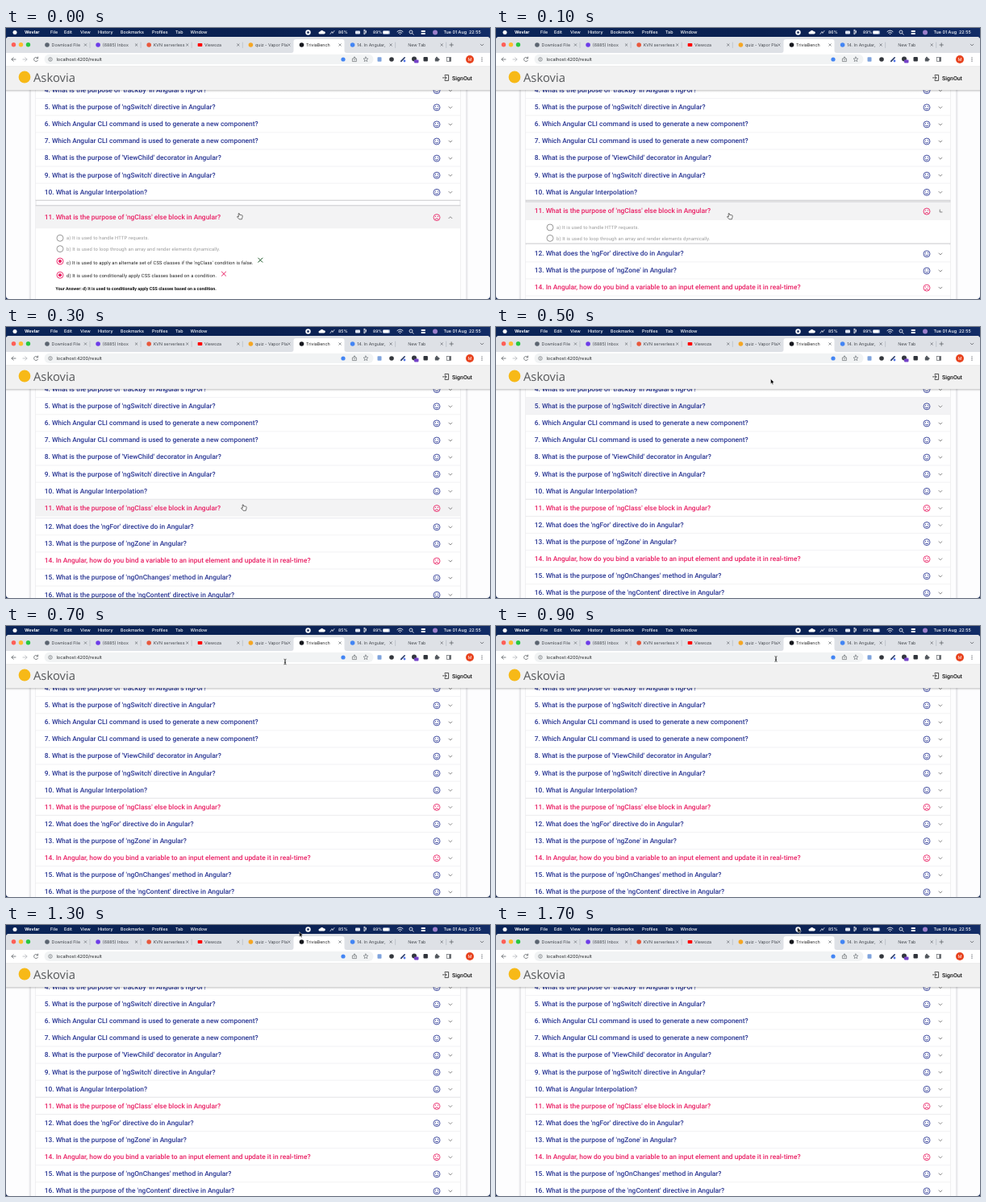
These frames come from a looping animation (600x337 px, 1.8 s). An HTML page:

```html
<!DOCTYPE html>
<html lang="en">
<head>
<meta charset="utf-8">
<title>Quiz result</title>
<style>
  html, body { margin: 0; width: 100%; height: 100%; overflow: hidden; background: #0b2150; }
  svg { display: block; width: 600px; height: 337px; }
  svg svg { width: 40px; height: 15px; }
  text { font-family: Roboto, sans-serif; text-rendering: geometricPrecision; white-space: pre; }
  .ui { font-family: Inter, sans-serif; }
  .brand { font-family: "Open Sans", sans-serif; }
  .line { fill: none; stroke-linecap: round; stroke-linejoin: round; }
</style>
</head>
<body>
<svg id="stage" viewBox="0 0 600 337">
  <defs>
    <linearGradient id="menuFill"><stop stop-color="#0b2558"/><stop offset=".55" stop-color="#0a2050"/><stop offset="1" stop-color="#122c66"/></linearGradient>
    <linearGradient id="headShade" x2="0" y2="1"><stop stop-color="#000" stop-opacity=".2"/><stop offset="1" stop-color="#000" stop-opacity="0"/></linearGradient>
    <clipPath id="windowClip"><rect y="11" width="600" height="326" rx="4"/></clipPath>
    <clipPath id="panelClip"><rect id="panelClipBox" x="37" width="526"/></clipPath>
  </defs>
  <rect width="600" height="337" fill="#0b2150"/>
  <g id="menu"></g>
  <g clip-path="url(#windowClip)">
    <rect y="11" width="600" height="326" fill="#fdfdfe"/>
    <g id="page"></g>
    <g id="browser"></g>
  </g>
  <g id="cursor"></g>
</svg>
<script>
const $ = id => document.getElementById(id);
const INK = '#283593', PINK = '#e91e63', GREY = '#5f6368';
const PITCH = 21.1, FIRST = 5, FIRST_Y = 98.2, SPLIT = 214.25;
const rowY = n => FIRST_Y + PITCH * (n - FIRST);

const text = (x, y, s, size, fill, more = '') =>
  `<text x="${x}" y="${y}" font-size="${size}" fill="${fill}" ${more}>${s}</text>`;
const rect = (x, y, w, h, fill, more = '') =>
  `<rect x="${x}" y="${y}" width="${w}" height="${h}" fill="${fill}" ${more}/>`;
const dot = (x, y, r, fill, more = '') => `<circle cx="${x}" cy="${y}" r="${r}" fill="${fill}" ${more}/>`;
const ring = (x, y, r, color, width = .8) => dot(x, y, r, 'none', `stroke="${color}" stroke-width="${width}"`);
const line = (d, color, width = .8, more = '') =>
  `<path class="line" d="${d}" stroke="${color}" stroke-width="${width}" ${more}/>`;
const cross = (x, y, r, color, width) =>
  line(`M${x - r} ${y - r}l${2 * r} ${2 * r}m0 ${-2 * r}l${-2 * r} ${2 * r}`, color, width);

// Menu bar
const menus = [[55, 'File'], [72, 'Edit'], [92, 'View'], [114, 'History'], [142, 'Bookmarks'],
  [181, 'Profiles'], [210, 'Tab'], [228.5, 'Window']];
const menuText = (x, s, weight = 500, size = 5.4) =>
  text(x, 7.4, s, size, '#fff', `class="ui" font-weight="${weight}"`);
$('menu').innerHTML = rect(0, 0, 600, 11, 'url(#menuFill)') + dot(11, 5.5, 2.5, '#fff') +
  menuText(23, 'Wevlar', 700) + menus.map(([x, s]) => menuText(x, s)).join('') +
  dot(374.5, 5.5, 3.2, '#fff') + rect(373.3, 4.3, 2.4, 2.4, '#0a2050') +
  '<path d="M389 7.6a1.6 1.6 0 0 1 .2-3.2 2.6 2.6 0 0 1 4.6-.2 1.7 1.7 0 0 1 .6 3.4z" fill="#fff"/>' +
  line('M402 7.5l2-3 1 2 2-3', '#fff', .7) +
  '<g id="charge"></g>' +
  rect(433, 3.4, 6, 4, '#dfe5f2', 'rx="1"') + line('M444 3l3 2.5-3 2.5v-6l3 2-3 2.5', '#fff', .7) +
  menuText(455, '89%', 500, 5) + rect(467, 3.2, 9, 4.6, '#8fa0c4', 'rx="1.2"') + rect(467.6, 3.8, 7, 3.4, '#fff', 'rx=".8"') +
  line('M485 4.5q3.5-3 7 0m-5.6 1.6q2.1-1.7 4.2 0', '#fff', .9) + dot(488.5, 7.6, .6, '#fff') +
  ring(502, 5, 2, '#fff') + line('M503.6 6.6l1.6 1.6', '#fff') +
  rect(514.5, 3, 5.5, 2.1, '#fff', 'rx="1"') + rect(514.5, 6, 5.5, 2.1, '#fff', 'rx="1"') +
  dot(532, 5.5, 3, '#9b7fc9') + menuText(542.5, 'Tue 01 Aug  22:55');

// Tabs, toolbar and page header
const tabs = [['Download File', '#5b6470'], ['(6885) Inbox', '#6d3be8'], ['KVN serverless', '#e8583c'], ['Viewoza', '#f00', 1],
  ['quiz - Vapor Pla', '#f5a623'], ['TriviaBench', '#16181d'], ['14. In Angular,', '#4285f4'], ['New Tab', null]];
const tabStart = i => 46 + i * 63.1;
const tab = ([label, color, square], i) => {
  const x = tabStart(i), active = i === 5;
  const icon = !color ? '' : square ? rect(x + 2.4, 19, 5.6, 4, color, 'rx=".8"') : dot(x + 5, 21, 2.8, color);
  return (active ? `<path d="M${x - 8} 31q3 0 3-3v-11q0-3 3-3h57q3 0 3 3v11q0 3 3 3z" fill="#fff"/>` : '') + icon +
    `<svg x="${x + 10.6}" y="14" width="40" height="15">` +
    text(0, 9.1, label, 5.3, active ? '#222' : '#43474d', 'class="ui"') + '</svg>' +
    cross(x + 52.5, 21, 1.3, '#50555b', .6) +
    (active || i === 4 ? '' : line(`M${x + 58} 18v6.5`, '#a3a9b3', .5));
};
const toolbar = rect(0, 31, 600, 17, '#fff') + rect(47.5, 32.8, 408, 12.2, '#f1f3f4', 'rx="6.1"') +
  line('M12 39h-5m2.2-2.3L7 39l2.2 2.3', GREY) + line('M21 39h5m-2.2-2.3L26 39l-2.2 2.3', '#b4b7bb') +
  line('M39.4 37.5a2.6 2.6 0 1 0 .2 2.6M39.6 36v1.9h-1.9', GREY) +
  ring(55, 39, 2.3, GREY, .6) + line('M55 38.8v1.3M55 37.8v.1', GREY, .6) +
  text(62.5, 41, 'localhost:4200/result', 5.6, '#27292c', 'class="ui"') +
  dot(418, 39, 2.6, '#4285f4') +
  line('M430.4 38h-1v3.6h5V38h-1M432 40v-4m-1.3 1.2L432 36l1.3 1.2', GREY, .65) +
  line('M446 36l.8 1.9 2.1.2-1.6 1.4.5 2.1-1.8-1.1-1.8 1.1.5-2.1-1.6-1.4 2.1-.2z', GREY, .6) +
  rect(460.5, 36.3, 5, 5.4, '#7fa3dd', 'rx=".8"') + dot(478, 39, 2.8, '#34373d') +
  line('M489.8 41.4l4.4-4.6', '#283a68', 1.6) + dot(494, 41, 1.4, '#5576e8') +
  dot(506, 38.5, 3, '#33373e') + rect(506, 39.5, 5.5, 4, '#7442c8', 'rx="1"') +
  rect(517.5, 36, 5.4, 5.6, '#30343b', 'rx="1"') +
  rect(531.8, 37.2, 4.6, 4.4, '#51565c', 'rx=".7"') + dot(534, 36.8, 1.1, '#51565c') + dot(536.6, 39.2, 1, '#51565c') +
  rect(546.6, 36.6, 5, 4.8, 'none', `stroke="${GREY}" stroke-width=".7"`) + rect(549.4, 36.6, 2.2, 4.8, GREY) +
  dot(575, 39, 5, '#e8431f') + text(575, 41, 'M', 5.4, '#fff', 'text-anchor="middle"') +
  [36.8, 39, 41.2].map(y => dot(590, y, .65, GREY)).join('');
const header = rect(0, 77, 600, 3, 'url(#headShade)') + rect(0, 47.6, 600, 29.4, '#f1f1f1') +
  line('M0 47.7h600', '#dcdcdc', .5) + dot(23, 61, 7.4, '#f7b917') +
  text(34, 67.4, 'Askovia', 14.8, '#55575a', 'class="brand"') +
  line('M544 59.2v-.8h4.6v7H544v-.8M541.5 61.9h4.4m-1.5-1.6l1.6 1.6-1.6 1.6', '#222') +
  text(553, 64.5, 'SignOut', 7, '#111', 'font-weight="500"');
$('browser').innerHTML = rect(0, 11, 600, 20, '#dee1e6') +
  ['#ff5f57', '#febc2e', '#28c840'].map((c, i) => dot(9.5 + 9 * i, 20.8, 2.7, c)).join('') +
  tabs.map(tab).join('') + line('M550 21h4.4m-2.2-2.2v4.4', GREY) + line('M588.3 20.2l1.8 1.8 1.8-1.8', GREY) +
  toolbar + header;

// Question list
const purpose = s => `What is the purpose of ${s} in Angular?`;
const generate = 'Which Angular CLI command is used to generate a new component?';
const questions = {
  4: "What is the purpose of 'trackBy' in Angular's ngFor?",
  5: purpose("'ngSwitch' directive"), 6: generate, 7: generate,
  8: purpose("'ViewChild' decorator"), 9: purpose("'ngSwitch' directive"),
  10: 'What is Angular Interpolation?', 11: purpose("'ngClass' else block"),
  12: "What does the 'ngFor' directive do in Angular?", 13: purpose("'ngZone'"),
  14: 'In Angular, how do you bind a variable to an input element and update it in real-time?',
  15: purpose("'ngOnChanges' method"), 16: purpose("the 'ngContent' directive")
};
const wrong = n => n === 11 || n === 14;
const face = (color, sad) => ring(534, 0, 4, color, .85) + dot(532.5, -1.2, .65, color) + dot(535.5, -1.2, .65, color) +
  line(sad ? 'M532 2.2q2-2.3 4 0' : 'M531.8 .8q2.2 2.8 4.4 0', color, .85);
const row = (n, y = rowY(n)) => {
  const color = wrong(n) ? PINK : INK;
  return `<g transform="translate(0 ${y})">` +
    text(47.7, 2.9, `${n}. ${questions[n]}`, 8.42, color, 'font-weight="500"') +
    `<g transform="translate(0 .6)">${face(color, wrong(n))}</g>` +
    line('M548.9 -.3l2 2 2-2', '#777', .85, n === 11 ? 'id="chevron"' : '') + '</g>';
};
const list = (from, to) => {
  let out = rect(37, rowY(from) - PITCH / 2, 526, PITCH * (to - from + 1), '#fff');
  if (from < 5) out += rect(37, rowY(5) - PITCH / 2, 526, PITCH, '#f3f3f5', 'id="hoverRow"');
  for (let n = from; n <= to; n++) {
    if (n < to) out += line(`M37 ${rowY(n) + PITCH / 2}h526`, '#e9e9ec', .6);
    out += row(n);
  }
  return out;
};
const option = (y, s, on, textY = y) => {
  const color = on ? PINK : '#8d8d8d';
  return ring(67, y, 4, color, .9) + (on ? dot(67, y, 2.1, color) : '') +
    text(75, textY + 2.1, s, 5.85, on ? '#222' : '#9a9a9a', 'letter-spacing=".125"');
};
const answer = 'd) It is used to conditionally apply CSS classes based on a condition.';
const body = option(0, 'a) It is used to handle HTTP requests.') +
  option(13.4, 'b) It is used to loop through an array and render elements dynamically.') +
  option(28.8, "c) It is used to apply an alternate set of CSS classes if the 'ngClass' condition is false.", 1, 30.4) +
  cross(315.3, 27.4, 2.6, '#1d5a2a', 1) +
  option(46, answer, 1, 46.7) + cross(270, 44.4, 2.6, PINK, 1) +
  text(61.5, 64.4, 'Your Answer: ' + answer, 5.4, '#111', 'font-weight="700"');

$('page').innerHTML =
  [30, 571].map(x => line(`M${x} 77v260`, '#c9c9cf', .8) + line(`M${x < 99 ? x - 1 : x + 1} 77v260`, '#ececf0', 1)).join('') +
  [37, 563].map(x => line(`M${x} 77v260`, '#dcdce0', .8)).join('') +
  list(4, 10) +
  `<g clip-path="url(#panelClip)">${rect(37, 0, 526, 337, '#fff')}${rect(37, 0, 526, 0, '#f3f3f4', 'id="head"')}` +
  `<g id="body">${body}</g><g id="title">${row(11, 0)}</g></g>` +
  `<g id="below">${list(12, 16)}</g><path id="edges" class="line" stroke-width=".9"/>`;

// Pointer shapes, placed around their tip or centre
const shapes = {
  hand: '<path d="M-1.8-3.4q.9-.6 1.3.3l.4 1.8.9-.3.8.2.8.1q.9.2.8 1.2l-.5 2.6-.4 1.3h-3.2l-2.4-2.7q-.3-.9.8-.7l.8.5z" fill="#fff" stroke="#111" stroke-width=".6"/>',
  arrow: '<path d="M0 0v6.2l1.4-1.3.9 2.1 1.1-.5-.9-2h1.9z" fill="#000" stroke="#fff" stroke-width=".45"/>',
  beam: line('M-1.2-3.3q1.2 0 1.2.8V2.5q0 .8-1.2.8M1.2-3.3Q0-3.3 0-2.5V2.5q0 .8 1.2.8M-.7.9h1.4', '#222', .65)
};
const STEP = 100;
const pointer = [
  ['hand', 290, 234], ['hand', 290, 234], ['hand', 290, 234], ['hand', 295, 224.5], ['hand', 295, 224.5],
  ['arrow', 340.5, 64.5], ['arrow', 343.5, 54], ['beam', 346, 44.5], ['beam', 347, 42], ['beam', 347, 41],
  ['beam', 347.3, 40.4], ['beam', 350, 35], ['arrow', 359, 17], ['arrow', 363.7, 8.5],
  ['arrow', 369, 5.4], ['arrow', 372.4, 4], ['arrow', 373.5, 3.5], ['arrow', 374, 3.3]
];

function draw(step) {
  const open = step < 5 ? Math.pow(.26, Math.min(step, 3)) : 0;
  const gap = 6.5 * open, top = SPLIT + gap;
  const headHeight = PITCH + 7.4 * open, bottom = top + headHeight + 112 * open;
  const move = (id, y) => $(id).setAttribute('transform', `translate(0 ${y})`);

  $('panelClipBox').setAttribute('y', top);
  $('panelClipBox').setAttribute('height', bottom - top);
  $('head').setAttribute('y', top);
  $('head').setAttribute('height', headHeight);
  $('head').style.opacity = step < 5 ? 1 : 0;
  move('title', top + headHeight / 2);
  move('body', top + headHeight + 8 + 4 * open);
  move('below', bottom + gap - SPLIT - PITCH);
  $('chevron').setAttribute('transform', `rotate(${180 * open} 550.9 .7)`);
  $('hoverRow').style.opacity = step === 5 ? 1 : 0;

  $('edges').setAttribute('d', `M37 ${SPLIT}h526M37 ${top}h526M37 ${bottom}h526`);
  $('edges').setAttribute('stroke', open > .05 ? '#c4c4c8' : '#e9e9ec');
  $('charge').innerHTML = menuText(412, step < 3 ? '86%' : '85%', 500, 5.2);

  const [shape, x, y] = pointer[step];
  $('cursor').innerHTML = shapes[shape];
  $('cursor').setAttribute('transform', `translate(${x} ${y})`);
}

let shown = -1;
function tick() {
  const step = Math.floor(performance.now() / STEP) % pointer.length;
  if (step !== shown) draw(shown = step);
  requestAnimationFrame(tick);
}
tick();
</script>
</body>
</html>
```
